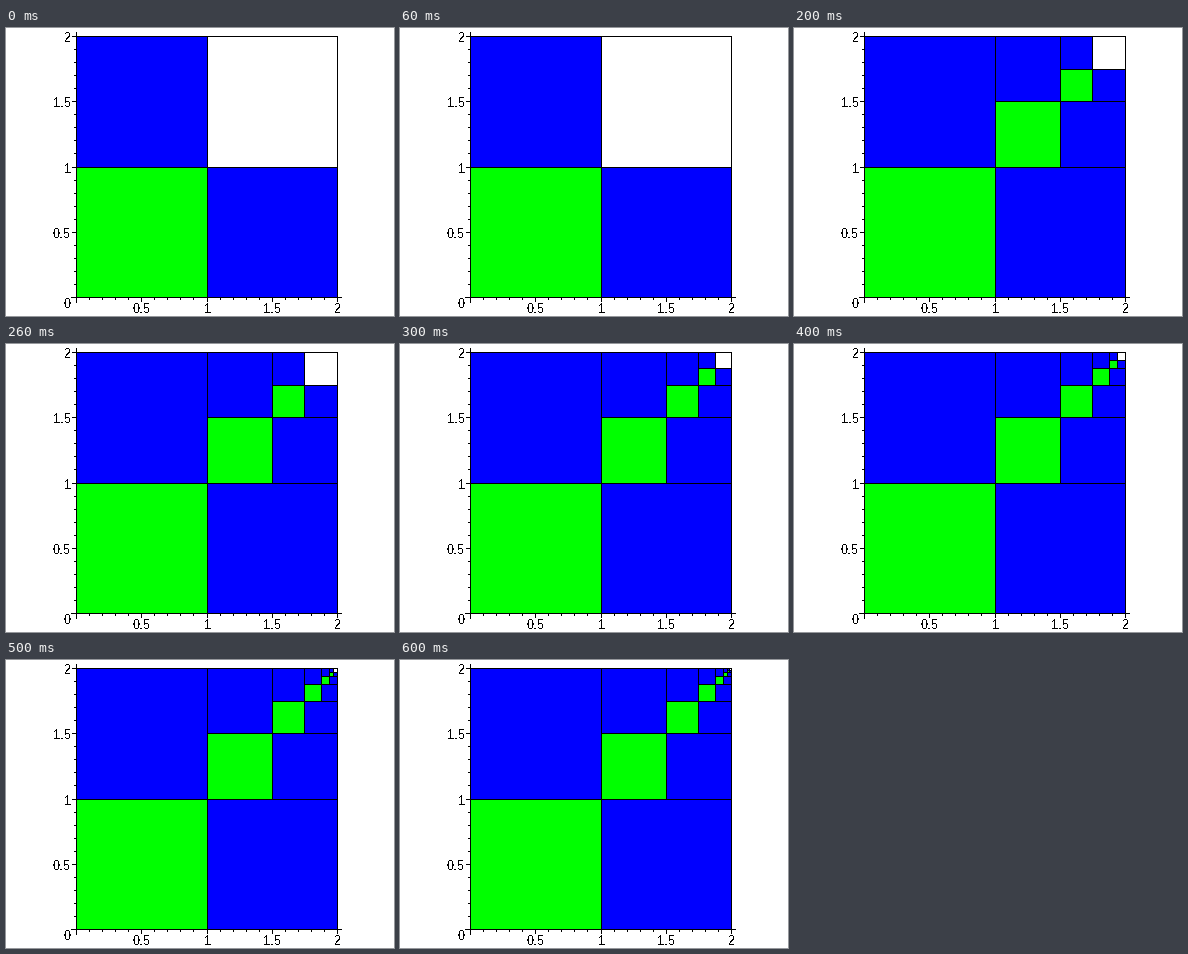
A matplotlib script for the animation above (700 ms loop, 388 px wide and 288 px high).

```python
import math

import matplotlib.pyplot as plt
from matplotlib.animation import FuncAnimation
from matplotlib.patches import Rectangle

W, H, DPI = 388, 288, 100
STEPS = 7
LEFT, BASE, UNIT = 70, 269, 130.5
BLUE, GREEN = "#0000ff", "#00ff00"

plt.rcParams.update({
    "font.family": "Liberation Sans",
    "text.antialiased": False,
    "text.hinting": "native",
    "text.hinting_factor": 1,
})

fig = plt.figure(figsize=(W / DPI, H / DPI), dpi=DPI, facecolor="white")
ax = fig.add_axes([0, 0, 1, 1])
ax.set_xlim(0, W)
ax.set_ylim(H, 0)
ax.axis("off")


def px(v):
    return math.floor(LEFT + UNIT * v + 0.5)


def py(v):
    return math.floor(BASE - UNIT * v + 0.5)


def fill(x0, y0, x1, y1, color="black", z=1):
    """Solid block covering pixels x0..x1 and y0..y1 inclusive."""
    patch = Rectangle((x0, y0), x1 - x0 + 1, y1 - y0 + 1,
                      facecolor=color, linewidth=0, antialiased=False, zorder=z)
    return ax.add_patch(patch)


def box(u0, v0, u1, v1, color, z):
    """Filled cell with a one pixel black outline, in plot units."""
    x0, x1, y0, y1 = px(u0), px(u1), py(v1), py(v0)
    parts = [fill(x0, y0, x1, y1, "black", z)]
    if x1 - x0 > 1 and y1 - y0 > 1:
        parts.append(fill(x0 + 1, y0 + 1, x1 - 1, y1 - 1, color, z + 0.5))
    return parts


def label(x, y, s, ha):
    ax.text(x, y, s, ha=ha, va="baseline", fontsize=13 * 72 / DPI, zorder=50)


def draw_axes():
    fill(LEFT - 5, BASE, px(2) + 4, BASE, z=40)
    fill(LEFT, py(2) - 4, LEFT, BASE + 5, z=40)
    for i in range(1, 21):
        v = i / 10
        size = 4 if i % 5 == 0 else 2
        fill(px(v), BASE, px(v), BASE + size, z=40)
        fill(LEFT - size, py(v), LEFT, py(v), z=40)
    for v in (0.5, 1, 1.5, 2):
        label(px(v) + 0.5, 285, f"{v:g}", "center")
        label(65, py(v) + 6, f"{v:g}", "right")
    label(65, 280, "0", "right")


def make_step(k):
    """The three cells of level k; the fourth corner stays open."""
    s = 0.5 ** k
    a, b = 2 - 2 * s, 2 - s
    z = 3 + 2 * k
    return (box(a, b, b, 2, BLUE, z)
            + box(b, a, 2, b, BLUE, z)
            + box(a, a, b, b, GREEN, z + 1))


box(0, 0, 2, 2, "white", 1)
steps = [make_step(k) for k in range(STEPS)]
draw_axes()


def update(i):
    for k, parts in enumerate(steps):
        for p in parts:
            p.set_visible(k <= i)
    return [p for parts in steps for p in parts]


anim = FuncAnimation(fig, update, frames=STEPS, interval=100,
                     repeat=True, repeat_delay=0, blit=False)
plt.show()
```
